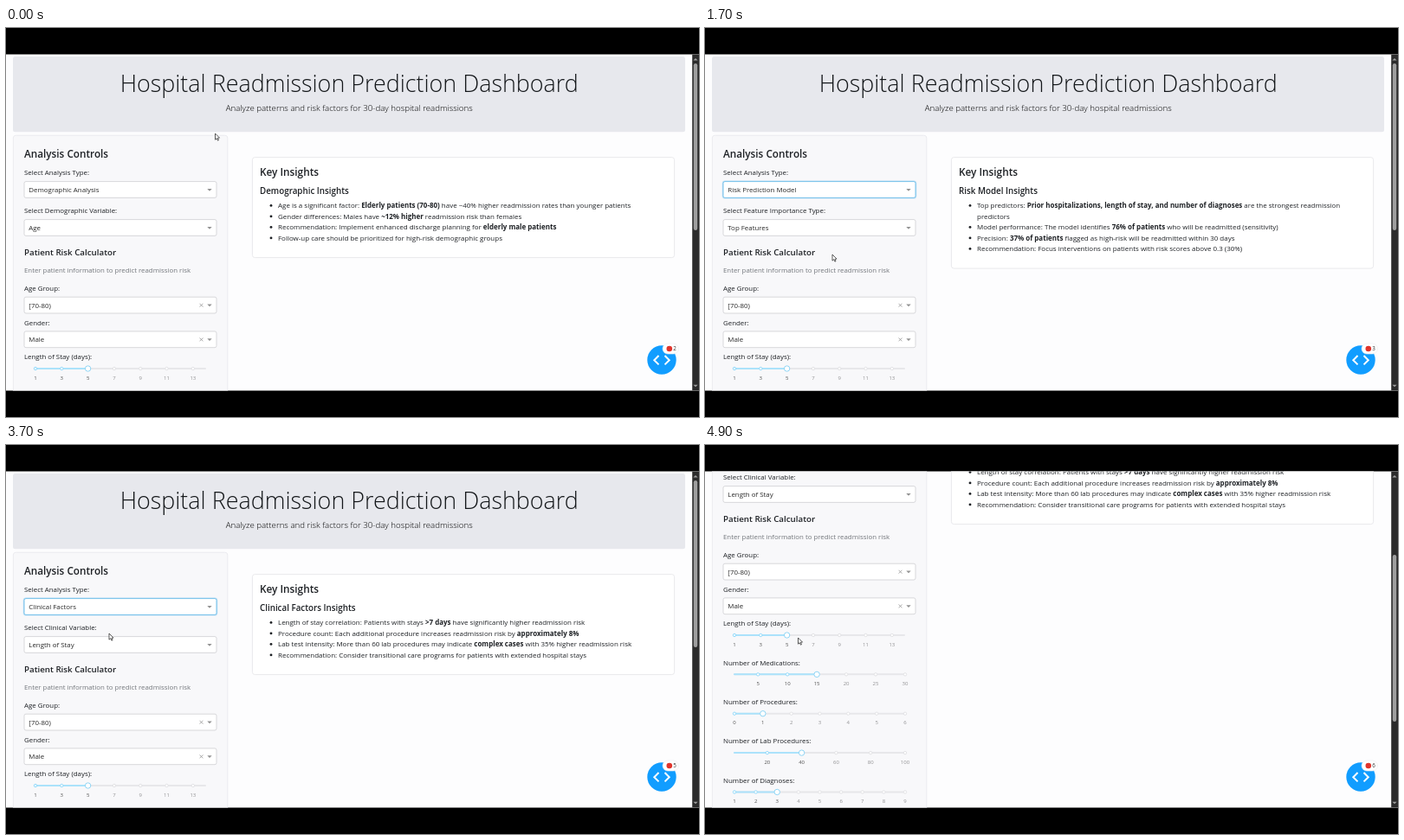
An HTML page with a canvas for the animation above (5000 ms loop, 800 px wide and 450 px high).

```html
<!DOCTYPE html>
<html lang="en">
<head>
<meta charset="utf-8">
<title>Hospital Readmission Prediction Dashboard</title>
<style>
html, body { margin: 0; width: 100%; height: 100%; overflow: hidden; background: #000; }
canvas { display: block; width: 800px; height: 450px; }
</style>
</head>
<body>
<canvas id="stage" width="800" height="450"></canvas>
<script>
const ctx = document.getElementById('stage').getContext('2d');
const LOOP = 5000, STEP = 100;
const TOP = 30.5, BOTTOM = 419.5, PAGE_W = 792.2;
const MENU_Y = 196.5, ROW_H = 18.2;
const INK = '#1e2125', MUTED = '#73777c', LINE = '#cfcfd2';

const OPTIONS = ['Demographic Analysis', 'Clinical Factors', 'Medication Analysis',
  'Risk Prediction Model', 'Financial Impact'];

// Asterisks mark bold runs; a leading "|" continues the previous bullet.
const VIEWS = {
  demographic: {
    label: 'Select Demographic Variable:', value: 'Age', title: 'Demographic Insights',
    rows: [
      'Age is a significant factor: *Elderly patients (70-80)* have ~40% higher readmission rates than younger patients',
      'Gender differences: Males have *~12% higher* readmission risk than females',
      'Recommendation: Implement enhanced discharge planning for *elderly male patients*',
      'Follow-up care should be prioritized for high-risk demographic groups']
  },
  risk: {
    label: 'Select Feature Importance Type:', value: 'Top Features', title: 'Risk Model Insights',
    rows: [
      'Top predictors: *Prior hospitalizations, length of stay, and number of diagnoses* are the strongest readmission',
      '|predictors',
      'Model performance: The model identifies *76% of patients* who will be readmitted (sensitivity)',
      'Precision: *37% of patients* flagged as high-risk will be readmitted within 30 days',
      'Recommendation: Focus interventions on patients with risk scores above 0.3 (30%)']
  },
  clinical: {
    label: 'Select Clinical Variable:', value: 'Length of Stay', title: 'Clinical Factors Insights',
    rows: [
      'Length of stay correlation: Patients with stays *>7 days* have significantly higher readmission risk',
      'Procedure count: Each additional procedure increases readmission risk by *approximately 8%*',
      'Lab test intensity: More than 60 lab procedures may indicate *complex cases* with 35% higher readmission risk',
      'Recommendation: Consider transitional care programs for patients with extended hospital stays']
  }
};

const SLIDERS = [
  { label: 'Length of Stay (days):', min: 1, max: 14, first: 1, step: 2, value: 5 },
  { label: 'Number of Medications:', min: 1, max: 30, first: 5, step: 5, value: 15 },
  { label: 'Number of Procedures:', min: 0, max: 6, first: 0, step: 1, value: 1 },
  { label: 'Number of Lab Procedures:', min: 1, max: 100, first: 20, step: 20, value: 40 },
  { label: 'Number of Diagnoses:', min: 1, max: 9, first: 1, step: 1, value: 3 }
];

// Time, then values
const POINTER = [[0, 241.5, 122], [600, 150, 187], [900, 150, 187], [1200, 147, 262], [2200, 147, 262],
  [2500, 118.5, 259], [2800, 119, 188], [3000, 119, 188], [3200, 119, 218], [3700, 119, 218], [4200, 107.5, 223]];
const SCROLL = [[4400, 0], [4500, 40], [4600, 87], [4700, 122], [4800, 151], [4900, 174]];

function track(keys, t) {
  let i = keys.findIndex(k => k[0] > t);
  if (i < 0) i = keys.length;
  if (i === 0 || i === keys.length) return keys[Math.max(0, i - 1)].slice(1);
  const a = keys[i - 1], b = keys[i], f = (t - a[0]) / (b[0] - a[0]);
  return a.slice(1).map((v, n) => v + (b[n + 1] - v) * f);
}

function stateAt(t) {
  const [x, y] = track(POINTER, t);
  return {
    x, y,
    scroll: track(SCROLL, t)[0],
    open: (t >= 900 && t < 1600) || (t >= 2900 && t < 3600),
    focus: t >= 1600,
    control: t < 1600 ? 0 : t < 3600 ? 3 : 1,
    view: t < 1700 ? VIEWS.demographic : t < 3700 ? VIEWS.risk : VIEWS.clinical,
    count: 2 + [1700, 1800, 3700, 3800].filter(k => t >= k).length
  };
}

function text(str, x, y, size, { weight = 400, color = INK, align = 'left' } = {}) {
  ctx.font = `${weight} ${size}px "Open Sans", "Noto Sans", sans-serif`;
  ctx.fillStyle = color;
  ctx.textAlign = align;
  ctx.fillText(str, x, y);
  return ctx.measureText(str).width;
}

function box(x, y, w, h, r, fill, stroke, width = 0.8) {
  ctx.beginPath();
  ctx.roundRect(x, y, w, h, r);
  if (fill) { ctx.fillStyle = fill; ctx.fill(); }
  if (stroke) { ctx.strokeStyle = stroke; ctx.lineWidth = width; ctx.stroke(); }
}

function disc(x, y, r, fill, stroke, width = 1) {
  ctx.beginPath();
  ctx.arc(x, y, r, 0, Math.PI * 2);
  ctx.fillStyle = fill;
  ctx.fill();
  if (stroke) { ctx.strokeStyle = stroke; ctx.lineWidth = width; ctx.stroke(); }
}

function line(points, color, width) {
  ctx.beginPath();
  points.forEach(([x, y]) => ctx.lineTo(x, y));
  ctx.strokeStyle = color;
  ctx.lineWidth = width;
  ctx.stroke();
}

function triangle(x, y, half, dir, color) {
  ctx.beginPath();
  ctx.moveTo(x - half, y - dir * half / 2);
  ctx.lineTo(x + half, y - dir * half / 2);
  ctx.lineTo(x, y + dir * half / 2);
  ctx.fillStyle = color;
  ctx.fill();
}

function header() {
  box(8, 33, 776, 87.2, 2.5, '#e7e8ed');
  text('Hospital Readmission Prediction Dashboard', 396.2, 74.2, 26.9, { weight: 300, color: '#14171a', align: 'center' });
  text('Analyze patterns and risk factors for 30-day hospital readmissions', 396.2, 95.7, 9.68,
    { weight: 300, color: '#000', align: 'center' });
}

function select(value, cy, { clear, open, focus } = {}) {
  if (focus) box(20.7, cy - 9.6, 222.6, 19.2, 2.4, null, 'rgba(90,180,235,.35)', 2);
  box(21, cy - 9.4, 222, 18.8, 2, '#fff', focus ? '#58b4e6' : LINE);
  text(value, 26.3, cy + 2.9, 7.9, { color: open ? '#5e6063' : '#2a2a2a' });
  triangle(235, cy + 0.3, 2.7, open ? -1 : 1, '#929292');
  if (clear) {
    line([[223.6, cy - 1.8], [227.4, cy + 2]], '#929292', 0.8);
    line([[227.4, cy - 1.8], [223.6, cy + 2]], '#929292', 0.8);
  }
  if (open) line([[26.5, cy - 5.5], [26.5, cy + 5.5]], '#111', 1);
}

function slider(s, cy) {
  const at = v => 34 + (v - s.min) / (s.max - s.min) * 197;
  const y = cy + 13.5, end = at(s.value);
  text(s.label, 21, cy + 2.8, 7.9);
  box(33, y - 1, 198, 2, 1, '#e7e7ea');
  box(33, y - 1, end - 33, 2, 1, '#abe2fb');
  for (let v = s.first; v <= s.max; v += s.step) {
    const on = v <= s.value;
    disc(at(v), y, 1.7, '#fff', on ? '#96dbfa' : '#e3e3e6');
    text(v, at(v), cy + 26.1, 6, { color: on ? '#505050' : '#919193', align: 'center' });
  }
  disc(end, y, 3.2, '#fff', '#8fd5f5');
}

function controls(s) {
  box(8.4, 124.2, 247.4, 650, 3, '#f8f8fa', '#e8e8ec');
  text('Analysis Controls', 21, 150, 11.75, { weight: 600 });
  text('Select Analysis Type:', 21, 170.3, 7.9);
  text(s.view.label, 21, 214.2, 7.9);
  select(s.view.value, 231);
  text('Patient Risk Calculator', 21, 262.8, 9.75, { weight: 600 });
  text('Enter patient information to predict readmission risk', 21, 283.2, 7.85, { color: MUTED });
  text('Age Group:', 21, 303.8, 7.9);
  select('[70-80)', 320.6, { clear: true });
  text('Gender:', 21, 343.6, 7.9);
  select('Male', 360.3, { clear: true });
  SLIDERS.forEach((sl, i) => slider(sl, 380.5 + i * 45.37));
  select(OPTIONS[s.control], 187, { open: s.open, focus: s.focus && !s.open });
  if (s.open) menu(s);
}

function menu(s) {
  const h = ROW_H * OPTIONS.length;
  const hover = Math.floor((s.y - MENU_Y) / ROW_H);
  const lit = hover >= 0 ? hover : s.control;
  box(21, MENU_Y, 222, h, [0, 0, 2, 2], '#fff', LINE);
  line([[21.4, MENU_Y], [242.6, MENU_Y]], '#e6e6e8', 1);
  OPTIONS.forEach((name, i) => {
    const y = MENU_Y + i * ROW_H;
    if (i === lit) {
      ctx.fillStyle = '#e4effb';
      ctx.fillRect(21.5, y, 221, ROW_H);
    }
    text(name, 25.6, y + 11.9, 7.9, { weight: i === s.control ? 700 : 400, color: i === s.control ? '#1a1a1a' : '#333538' });
  });
}

function insights(view) {
  const rowY = i => 208.1 + i * 12.5;
  box(284.4, 149.6, 487.2, rowY(view.rows.length - 1) + 20 - 149.6, 3, '#fff', '#e4e4e8');
  text('Key Insights', 293, 171, 11.8, { weight: 600 });
  text(view.title, 293, 192, 9.8, { weight: 600 });
  view.rows.forEach((row, i) => {
    const y = rowY(i);
    if (row[0] !== '|') disc(306, y - 2.7, 1.45, INK);
    let x = 314;
    row.replace('|', '').split('*').forEach((run, n) => {
      x += text(run, x, y, 7.97, { weight: n % 2 ? 700 : 400 });
    });
  });
}

function scrollbar(scroll) {
  ctx.fillStyle = '#2c2c2c';
  ctx.fillRect(PAGE_W, TOP, 800 - PAGE_W, BOTTOM - TOP);
  triangle(796, 36.3, 2.6, -1, '#9f9f9f');
  triangle(796, 414, 2.6, 1, '#9f9f9f');
  box(793.8, 41 + scroll * 0.494, 4.4, 193, 2.2, '#9f9f9f');
}

function devButton(count) {
  disc(757, 384, 16.7, '#119dff');
  line([[753.5, 379], [748.3, 384.2], [753.5, 389.4]], '#fff', 2);
  line([[760.5, 379], [765.7, 384.2], [760.5, 389.4]], '#fff', 2);
  box(758, 365, 18.5, 12, 6, '#fff', '#ececf0', 0.6);
  disc(765.8, 371, 3.3, '#e0342c');
  text(count, 772, 373.2, 6.2, { color: '#333', align: 'center' });
}

function shape(x, y, points) {
  ctx.beginPath();
  points.forEach(([dx, dy]) => ctx.lineTo(x + dx, y + dy));
  ctx.closePath();
  ctx.fillStyle = '#fff';
  ctx.fill();
  ctx.strokeStyle = '#333';
  ctx.lineWidth = 0.8;
  ctx.stroke();
}

function pointer({ x, y, open }) {
  if (open && y > MENU_Y) {
    shape(x, y, [[0, 0.6], [0.8, 0], [1.6, 0.6], [1.6, 3.6], [4.4, 4.2], [5.2, 5], [5, 7.4], [4.2, 9.6],
      [0.6, 9.6], [-1.8, 6.4], [-1.4, 5.4], [0, 6.2]]);
  } else if (y > 254 && y < 264 && x < 127) {
    line([[x, y - 4], [x, y + 4]], '#222', 0.9);
    line([[x - 1.6, y - 4], [x + 1.6, y - 4]], '#222', 0.8);
    line([[x - 1.6, y + 4], [x + 1.6, y + 4]], '#222', 0.8);
  } else {
    shape(x, y, [[0, 0], [0, 7.2], [1.7, 5.7], [2.9, 8.2], [4, 7.7], [2.9, 5.3], [5, 5.1]]);
  }
}

function draw(t) {
  const s = stateAt(t);
  ctx.fillStyle = '#000';
  ctx.fillRect(0, 0, 800, 450);
  ctx.save();
  ctx.beginPath();
  ctx.rect(0, TOP, 800, BOTTOM - TOP);
  ctx.clip();
  ctx.fillStyle = '#fdfdfe';
  ctx.fillRect(0, 0, 800, 450);
  ctx.save();
  ctx.translate(0, -s.scroll);
  header();
  insights(s.view);
  controls(s);
  ctx.restore();
  scrollbar(s.scroll);
  devButton(s.count);
  pointer(s);
  ctx.restore();
}

let start = null;
function tick(now) {
  if (start === null) start = now;
  const t = (now - start) % LOOP;
  draw(Math.floor(t / STEP) * STEP);
  requestAnimationFrame(tick);
}
draw(0);
requestAnimationFrame(tick);
</script>
</body>
</html>
```
